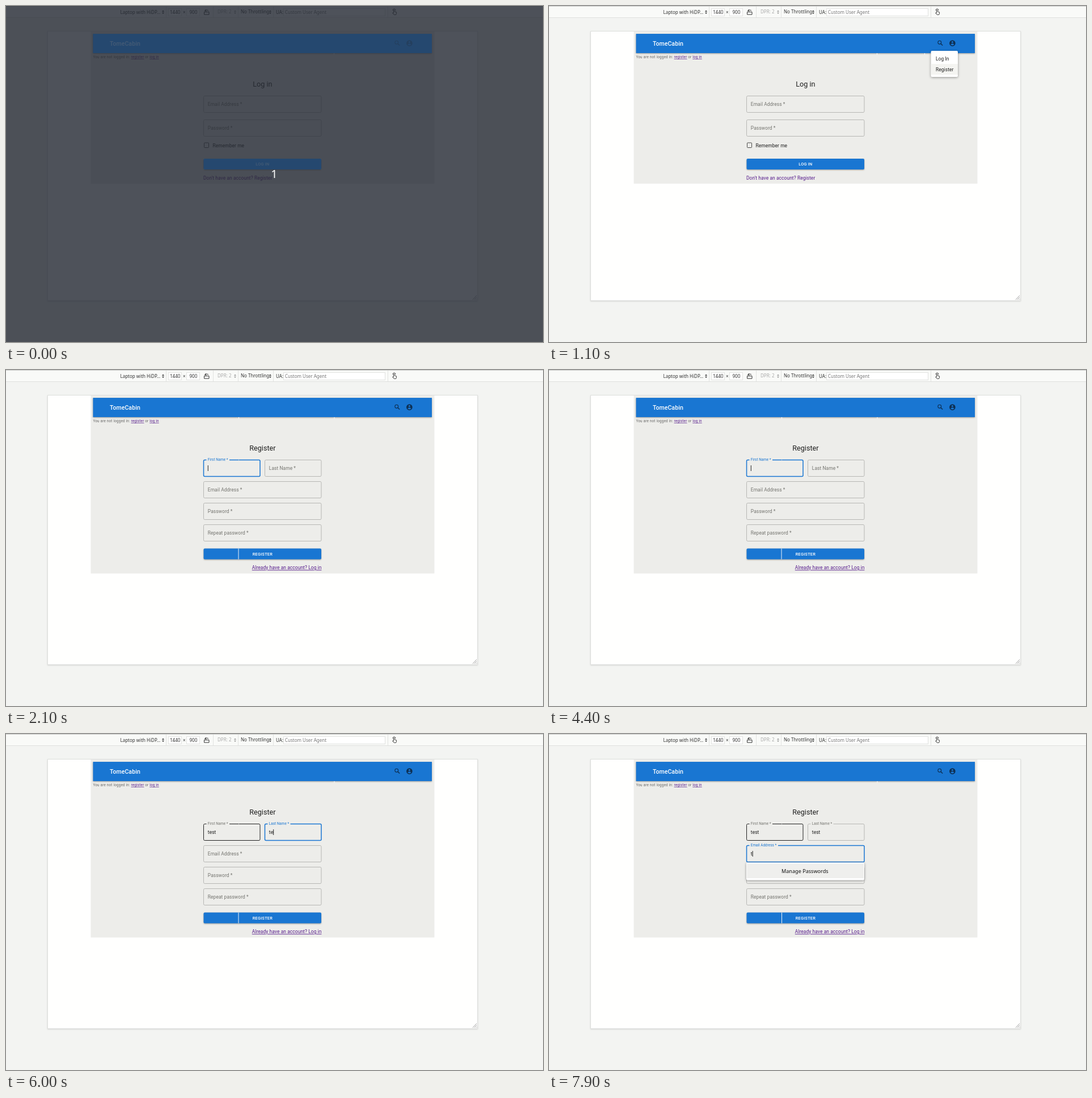
Recreate the animation shown at these times as an HTML page. Size 947 by 592 pixels, loop 8000 ms.

```html
<!DOCTYPE html>
<html lang="en">
<head>
<meta charset="utf-8">
<title>Registration form</title>
<style>
  html, body { margin: 0; width: 100%; height: 100%; overflow: hidden; background: #f3f4f2; }
  svg { display: block; width: 100%; height: 100%; }
  text { font: 8.42px Roboto, sans-serif; letter-spacing: .0094em; fill: #1e1e1e; }
  .tool { font: 8px "Noto Sans", sans-serif; letter-spacing: 0; fill: #333; }
  .popup { font: 9.1px "Noto Sans", sans-serif; letter-spacing: 0; fill: #111; }
  .brand { font-size: 10.53px; font-weight: 500; fill: #fff; letter-spacing: .0075em; }
  .title { font-size: 12.63px; letter-spacing: 0; text-anchor: middle; }
  .caption { font-size: 6.32px; letter-spacing: .033em; fill: #666; }
  .button { font-size: 7.37px; font-weight: 500; fill: #fff; letter-spacing: .0286em; text-anchor: middle; }
  .link { fill: #551a8b; }
  .under { text-decoration: underline; }
  .count { font: 20px "Noto Sans", sans-serif; fill: #fff; text-anchor: middle; }
  .low { filter: drop-shadow(0 1px 1px rgba(0,0,0,.35)); }
  .high { filter: drop-shadow(0 1.5px 2px rgba(0,0,0,.4)); }
</style>
</head>
<body>
<svg id="stage" viewBox="0 0 947 592" preserveAspectRatio="none"></svg>
<script>
const LOOP = 8000, STEP = 100;
const BLUE = '#1976d2', PAPER = '#ededea', IDLE = '#b7b7b4', DARK = '#212121', ICON = '#0e2f52';
const ADVANCE = { t: 2.83, e: 4.55, s: 4.45 };

const rect = (x, y, w, h, fill, extra = '') =>
  `<rect x="${x}" y="${y}" width="${w}" height="${h}" fill="${fill}" ${extra}/>`;
const text = (x, y, str, cls = '', extra = '') =>
  `<text x="${x}" y="${y}" class="${cls}" ${extra}>${str}</text>`;
const line = (d, color, width = 1) =>
  `<path d="${d}" fill="none" stroke="${color}" stroke-width="${width}"/>`;
const mix = (a, b, p) => a + (b - a) * p;
const within = (t, from, to) => t >= from && t < to;
// Progress that already moves on its first step and ends on its last.
const ramp = (t, first, last) =>
  Math.max(0, Math.min(1, (t - first + STEP) / (last - first + STEP)));
// Number of keystrokes made by time t.
const typed = (t, times) => 'test'.slice(0, times.filter(at => t >= at).length);

function toolbar() {
  const arrows = (x, color) =>
    `<path d="M${x - 2} 10l2-2.6 2 2.6zM${x - 2} 11.4l2 2.6 2-2.6z" fill="${color}"/>`;
  const box = (x, w) => rect(x, 4.5, w, 13, '#fff', 'stroke="#e2e3e1"');
  return rect(0, 0, 947, 20, '#f9faf8') + line('M0 .5H947', '#c9cac8') + line('M0 20.5H947', '#dedfdd') +
    [282.5, 365.5, 409.5, 471.5, 673.5].map(x => line(`M${x} 1V20`, '#e2e3e1')).join('') +
    box(286.5, 23) + box(318.5, 23) + box(489.5, 179) +
    text(201.5, 13.8, 'Laptop with HiDP…', 'tool') + arrows(277, '#333') +
    text(289, 13.8, '1440', 'tool') + text(312, 13.8, '×', 'tool') + text(323.5, 13.8, '900', 'tool') +
    text(373, 13.4, 'DPR: 2', 'tool', 'style="fill:#aaa"') + arrows(404, '#999') +
    text(414, 13.4, 'No Throttling', 'tool') + arrows(466, '#333') +
    text(476, 13.8, 'UA:', 'tool') + text(492, 13.8, 'Custom User Agent', 'tool', 'style="fill:#777"') +
    line('M349.5 10.5h8.5v4.5h-8.5zM350.5 8.5q3-3 6.5-.5M352.5 6l-2 2.5 3 .5', '#333') +
    line('M683.5 12V7.5q1-1.3 1.8 0V10l3.2.8q.6 2-.8 4.5h-3.5l-2.6-3.3 1.9.3M682 8q0-3 2.5-3t2.5 3', '#333', .9);
}

function frame(height) {
  return rect(73.5, 44.5, 758, 474.5, '#fffffe', 'stroke="#dfe0de" style="filter:drop-shadow(0 1px 1px #0002)"') +
    line('M823 517.5l7-7.5M826 517.5l4-4.5M829 517.5l1.5-1.5', '#888', .8) +
    rect(149.5, 45, 606, height, PAPER) +
    rect(153.5, 49, 597.5, 34, BLUE, 'class="low"') +
    text(183, 69.7, 'TomeCabin', 'brand') +
    `<circle cx="688.8" cy="64.2" r="2.9" fill="none" stroke="${ICON}" stroke-width="1.1"/>` +
    line('M690.8 66.2l3.4 3.4', ICON, 1.4) +
    `<circle cx="711.4" cy="65.6" r="5.3" fill="${ICON}"/>` +
    `<circle cx="711.4" cy="63.5" r="1.6" fill="${BLUE}"/>` +
    `<path d="M708.2 67.7q3.2-3.2 6.4 0-3.2 3.4-6.4 0z" fill="${BLUE}"/>` +
    text(153.5, 92.2, 'You are not logged in: <tspan class="link under">register</tspan> or <tspan class="link under">log in</tspan>', 'caption');
}

const seam = x => line(`M${x} 83V86`, '#fafafa');

function field(x, y, w, label, { raise = 0, focus, hover, notch = 0, value = '', caret } = {}) {
  const color = focus ? BLUE : hover ? DARK : IDLE;
  const tx = x + 7.3, size = mix(1, .75, raise);
  const end = tx + [...value].reduce((sum, c) => sum + ADVANCE[c], 0);
  return rect(x, y, w, 29, 'none', `rx="2" stroke="${color}" stroke-width="${focus ? 1.5 : 1}"`) +
    (raise ? rect(x + 5, y - 1.5, notch * raise, 3, PAPER) : '') +
    text(0, 0, label + ' *', '', `transform="translate(${tx} ${mix(y + 17.9, y + 1.9, raise)}) scale(${size})" style="fill:${focus ? BLUE : '#74746f'}"`) +
    text(tx, y + 17.9, value) +
    (caret ? line(`M${end + .5} ${y + 9.5}v10`, '#222') : '');
}

const button = (y, label) =>
  rect(348.5, y, 207.5, 19, BLUE, 'rx="2" class="low"') + text(452.4, y + 12.2, label, 'button');

function loginPage() {
  return frame(268) + seam(578.5) + text(452.3, 142.3, 'Log in', 'title') +
    field(348.5, 158.5, 207.5, 'Email Address') + field(348.5, 200.5, 207.5, 'Password') +
    rect(349.5, 241, 8, 8.5, 'none', 'rx=".8" stroke="#4a4a48"') +
    text(364.5, 248.6, 'Remember me') + button(269, 'LOG IN') +
    text(348, 306, 'Don\'t have an account? Register', 'link');
}

function menu(t) {
  const shown = ramp(t, 600, 900) * (1 - ramp(t, 1200, 1400));
  if (!shown) return '';
  const size = t < 1000 ? mix(.75, 1, shown) : 1;
  return seam(662.5) +
    `<g opacity="${shown}" transform="translate(721 79) scale(${size}) translate(-721 -79)">` +
    rect(673.5, 79, 47.5, 46, '#fff', 'rx="2" class="high"') +
    (t >= 1000 ? rect(673.5, 102, 47.5, 19, '#f4f4f1') : '') +
    text(682, 96.2, 'Log In') + text(682, 114.6, 'Register') + '</g>';
}

function registerPage(t) {
  const first = {
    raise: ramp(t, 1900, 2100), notch: 40.5, focus: within(t, 1900, 5400), hover: t >= 1700,
    value: typed(t, [4800, 4800, 5000, 5100]),
    caret: within(t, 1900, 3200) || within(t, 4400, 5400)
  };
  const last = {
    raise: ramp(t, 5400, 5600), notch: 40, focus: within(t, 5400, 6600),
    value: typed(t, [5800, 6000, 6200, 6400]), caret: within(t, 5400, 6600)
  };
  const email = {
    raise: ramp(t, 6600, 6800), notch: 50.5, focus: t >= 6600,
    value: typed(t, [7800]), caret: t >= 6600
  };
  const seamX = t < 7800 ? 410 : 410.5;
  return frame(313.5) + seam(579) + (within(t, 1700, 5400) ? seam(410.5) : '') +
    text(452.4, 142.3, 'Register', 'title') +
    field(348.5, 158.5, 99.5, 'First Name', first) +
    field(456.5, 158.5, 99.5, 'Last Name', last) +
    field(348.5, 196.5, 207.5, 'Email Address', email) +
    field(348.5, 234.5, 207.5, 'Password') +
    field(348.5, 272.5, 207.5, 'Repeat password') +
    (t >= 1700 ? line('M410.5 157.5v2', '#dcdcda', .6) : '') +
    button(314.5, 'REGISTER') + line(`M${seamX} 314.5v19`, '#eef3f8') +
    text(433.8, 351.3, 'Already have an account? Log in', 'link under') +
    (within(t, 4800, 5400) ? rect(348, 189, 100, 24, '#fff', 'rx="2" class="low"') + text(356, 204, 'test', 'popup') : '') +
    (t >= 6800 ? rect(348, 226.5, 208, 31, '#fff', 'rx="2" class="high"') + rect(349, 228.5, 206, 25.5, '#efefed') +
      text(451.3, 245.2, 'Manage Passwords', 'popup', 'text-anchor="middle"') : '');
}

function countdown() {
  return rect(0, 0, 947, 592, 'rgba(37,43,52,.81)') +
    rect(153.5, 49, 597.5, 34, 'rgba(45,110,180,.3)') +
    rect(348.5, 269, 207.5, 19, 'rgba(45,110,180,.3)') +
    text(473, 303.3, '1', 'count');
}

const stage = document.getElementById('stage');
let shownAt = -1;
function play(now) {
  const t = Math.floor(now % LOOP / STEP) * STEP;
  if (t !== shownAt) {
    shownAt = t;
    stage.innerHTML = rect(0, 0, 947, 592, '#f3f4f2') + toolbar() +
      (t < 1300 ? loginPage() : registerPage(t)) + menu(t) + (t < 100 ? countdown() : '');
  }
  requestAnimationFrame(play);
}
const start = performance.now();
const tick = () => { play.call(null, performance.now() - start); };
requestAnimationFrame = (raf => () => raf.call(window, tick))(requestAnimationFrame);
tick();
</script>
</body>
</html>
```
